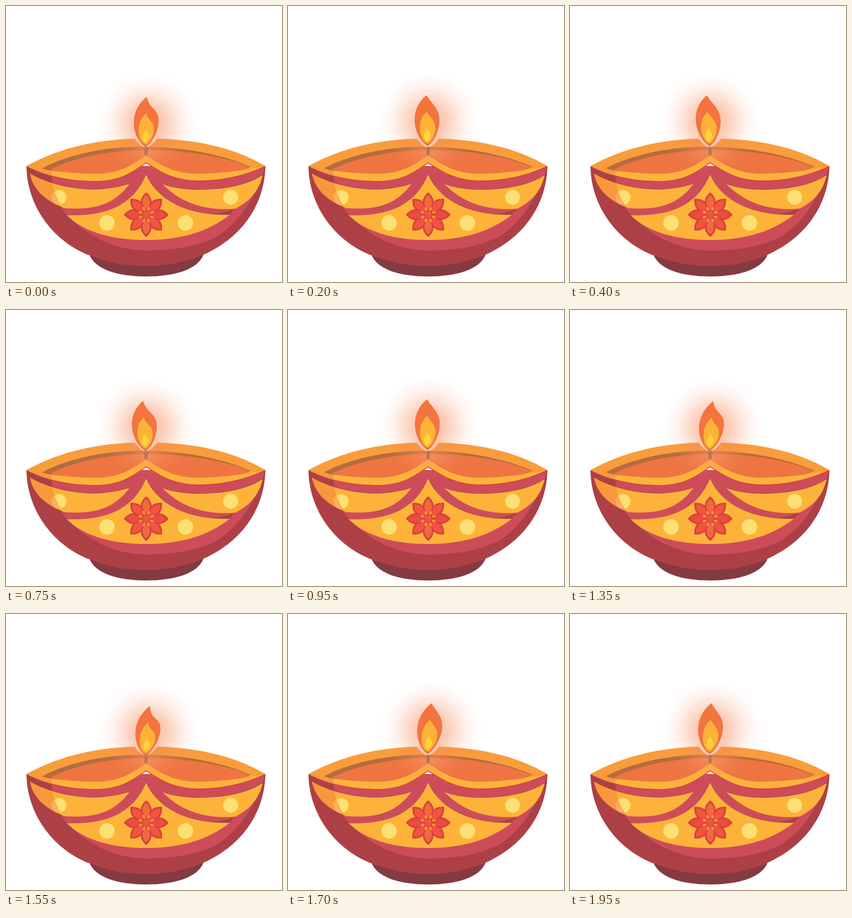
An HTML page for the animation above (2000 ms loop, 500 by 500 pixels).

```html
<!DOCTYPE html>
<html lang="en">
<head>
<meta charset="utf-8">
<title>Oil lamp</title>
<style>
  html, body { margin: 0; width: 100%; height: 100%; overflow: hidden; background: #fff; }
  svg { display: block; width: 100vw; height: 100vh; }
</style>
</head>
<body>
<svg viewBox="0 0 500 500">
  <defs>
    <radialGradient id="glowFill">
      <stop offset="0" stop-color="#f58a55" stop-opacity=".5"/>
      <stop offset=".3" stop-color="#f58350" stop-opacity=".42"/>
      <stop offset=".5" stop-color="#f57f4a" stop-opacity=".24"/>
      <stop offset=".7" stop-color="#f57f4a" stop-opacity=".09"/>
      <stop offset=".88" stop-color="#f57f4a" stop-opacity=".02"/>
      <stop offset="1" stop-color="#f57f4a" stop-opacity="0"/>
    </radialGradient>
    <radialGradient id="sheenFill">
      <stop offset="0" stop-color="#ffb08c" stop-opacity=".45"/>
      <stop offset="1" stop-color="#f58a55" stop-opacity="0"/>
    </radialGradient>
    <path id="frontRim" d="M37 290C75 299 125 304 165 304C212 303 232 284 254 271C276 284 298 303 345 304C390 303 430 299 470 290C430 309 388 317 348 317C298 316 277 298 254 284C231 299 211 318 160 318C118 317 73 309 37 290Z"/>
    <path id="leftSwag" d="M43 303C76 323 126 333 165 332C190 331 210 326 224 322C198 357 165 371 105 366C73 353 50 335 43 303Z"/>
    <path id="rightSwag" d="M283 322C312 333 346 334 382 331C415 328 444 320 465 306C459 334 443 353 416 367C363 372 316 357 283 322Z"/>
    <path id="apron" d="M254 305C233 356 189 382 110 379C139 408 189 424 254 424C319 424 367 408 406 378C336 380 276 356 254 305Z"/>
    <circle id="leftDot" cx="96" cy="347" r="13.5"/>
    <clipPath id="trim">
      <use href="#frontRim"/>
      <use href="#leftSwag"/>
      <use href="#leftDot"/>
    </clipPath>
    <g id="petal">
      <path fill="#d8403f" d="M0-5C-11-14-15-28 0-40.5C15-28 11-14 0-5Z"/>
      <path d="M0-8C-8-15-10-27 0-36C10-27 8-15 0-8Z"/>
    </g>
  </defs>

  <!-- foot and body -->
  <path fill="#843a40" d="M151 450C161 477 202 490 254 490C306 490 348 477 358 450Z"/>
  <path fill="#ad4047" d="M37 290C38 365 88 428 152 452C185 465 219 471 254 471C289 471 324 465 357 451C423 422 468 365 470 290Z"/>
  <path fill="#cd4c5a" d="M83 292C80 330 92 360 112 380C148 417 198 443 254 443C305 443 350 435 383 417C418 396 452 350 469 291Z"/>

  <!-- opening and oil -->
  <path fill="#f99d3c" d="M37 290C100 255 171 240 254 240C339 240 411 255 470 290C430 301 390 308 345 309C298 308 276 289 254 277C232 289 212 308 165 309C125 309 75 301 37 290Z"/>
  <path fill="#b56c3e" d="M65 294C110 270 181 254 250 255C321 255 392 269 443 291C414 303 385 308 345 308C298 307 276 288 254 276C232 288 212 307 165 308C125 308 90 303 65 294Z"/>
  <path fill="#ee7541" d="M80 296C123 275 183 262 252 261C316 260 388 270 440 291C414 303 385 308 345 308C298 307 276 288 254 276C232 288 212 307 165 308C125 308 95 304 80 296Z"/>

  <!-- yellow trim -->
  <g fill="#fdb33a">
    <use href="#frontRim"/>
    <use href="#leftSwag"/>
    <use href="#rightSwag"/>
    <use href="#apron"/>
  </g>
  <g fill="none">
    <path stroke="#d63f42" stroke-width="1.6" d="M75 306C105 315 130 318 160 318C211 318 231 299 254 284C277 298 298 316 348 317C388 317 430 309 469 291"/>
    <path stroke="#5c2a24" stroke-opacity=".5" stroke-width=".8" d="M43 303C76 323 126 333 165 332C190 331 210 326 224 322M283 322C312 333 346 334 382 331C415 328 444 320 465 306M406 378C336 380 276 356 254 305"/>
  </g>
  <path fill="#a9403f" d="M378 377C394 374 407 371 416 367L405 378Z"/>
  <g fill="#fee074">
    <use href="#leftDot"/>
    <circle cx="183" cy="393" r="14"/>
    <circle cx="325" cy="393" r="14"/>
    <circle cx="407" cy="346.5" r="13.5"/>
  </g>
  <path clip-path="url(#trim)" fill="#f47a3e" fill-opacity=".48" d="M30 280H83V292C80 322 90 350 108 372L30 380Z"/>

  <g id="flower" transform="translate(254 378)"></g>

  <!-- light -->
  <path fill="#fff" d="M233 240Q242 253 253 257Q265 253 274 240Z"/>
  <ellipse cx="256" cy="264" rx="68" ry="34" fill="url(#sheenFill)"/>
  <circle id="glow" r="95" fill="url(#glowFill)"/>
  <path fill="#b87852" d="M250 256Q254 254 258 256L256 270L254 271L251 270Z"/>

  <g id="flame">
    <path id="outer" fill="#f3743e"/>
    <path id="inner" fill="#fdb33a"/>
    <path fill="#fdd436" d="M0-32C-4-26-6-21-6-17C-5-12-3-10 0-9C4-12 6-16 6-20C6-25 2-27 0-32Z"/>
  </g>
</svg>
<script>
  const LOOP = 2000, FLICKER = 250, STEP = 50, HEIGHT = 92;
  const get = id => document.getElementById(id);
  const flame = get('flame'), glow = get('glow');
  const outer = get('outer'), inner = get('inner');

  const mix = (a, b, u) => a + (b - a) * u;
  const wave = (t, period, lag) => 2 * Math.PI * t / period - lag;

  function drawFlower() {
    const turned = (body, angle) => `<g transform="rotate(${angle})">${body}</g>`;
    let parts = '';
    for (const [start, color] of [[45, '#f0553f'], [90, '#ea4c3f'], [0, '#f0683e']])
      for (let angle = start; angle < 360; angle += start === 45 ? 90 : 180)
        parts += turned(`<use href="#petal" fill="${color}"/>`, angle);
    parts += '<circle r="9" fill="#d8403f"/>';
    for (let k = 0; k < 8; k++)
      parts += turned('<ellipse cy="-11" rx="1.6" ry="4" fill="#f99d3c"/>', 22.5 + k * 45);
    get('flower').innerHTML = parts + '<circle r="6" fill="#ee573f"/>';
  }

  // curl 0: full right edge, curl 1: edge bent in below the tip
  function shapeFlame(curl) {
    const at = (x0, y0, x1, y1) => `${mix(x0, x1, curl)} ${mix(y0, y1, curl)} `;
    outer.setAttribute('d', 'M1-92C-13-81-22-64-22-46C-22-25-12-8 0 0C12-8 23-29 23-48C' +
      at(24, -66, 23, -72) + at(11, -77, 3, -64) + '1-92Z');
    inner.setAttribute('d', 'M0-62C-9-53-13-44-13-32C-13-17-7-7 1-5C9-11 15-23 15-33C' +
      at(16, -44, 14, -49) + at(8, -51, 2, -46) + '0-62Z');
  }

  function draw(t) {
    const sway = -7 * Math.sin(wave(t, LOOP, 0.15));
    const dip = Math.cos(wave(t, FLICKER, 1.35));
    const tip = 163.9 + 2.7 * dip;
    const base = 255.5 + 1.7 * dip;
    shapeFlame((1 + dip) / 2);
    flame.setAttribute('transform',
      `matrix(1 0 ${-sway / HEIGHT} ${(base - tip) / HEIGHT} 253 ${base})`);
    glow.setAttribute('cx', 256.5 + sway * 0.4);
    glow.setAttribute('cy', 212 + 2.2 * dip);
  }

  drawFlower();
  const begin = performance.now();
  function tick() {
    const t = (performance.now() - begin) % LOOP;
    draw(Math.floor(t / STEP) * STEP);
    requestAnimationFrame(tick);
  }
  tick();
</script>
</body>
</html>
```
